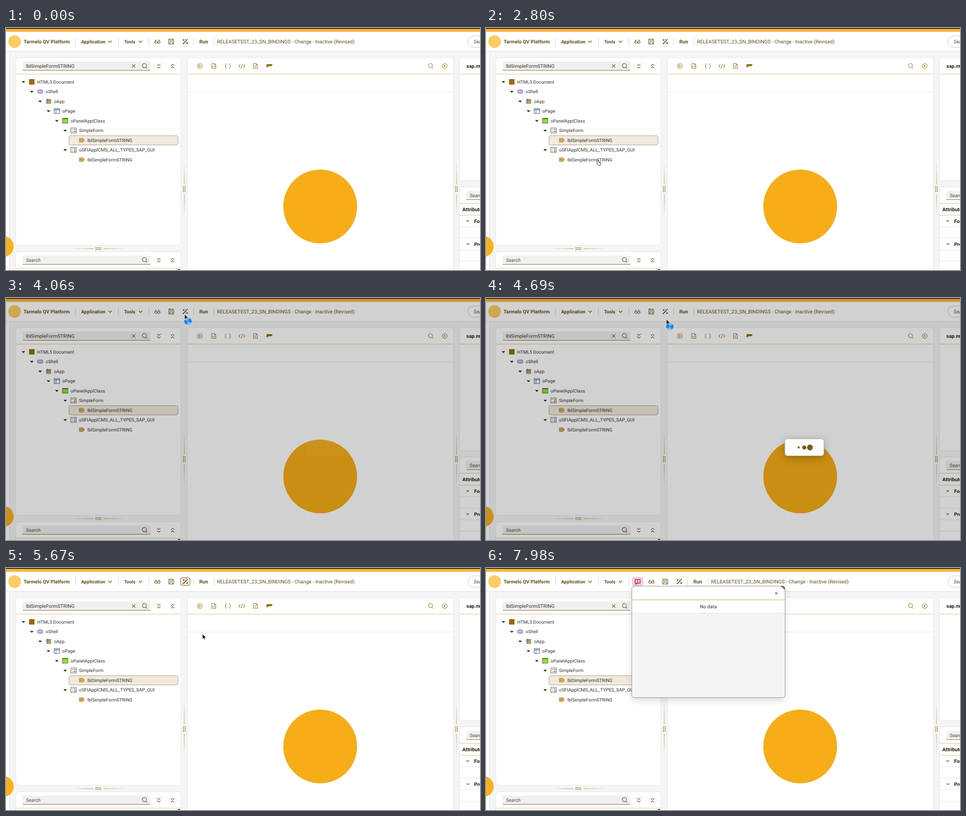
An HTML page for the animation above (8000 ms loop, 1047x535 px).

```html
<!DOCTYPE html>
<html lang="en">
<head>
<meta charset="utf-8">
<title>App designer</title>
<style>
html, body { margin: 0; width: 100%; height: 100%; overflow: hidden; background: #f5f5f5; }
svg { display: block; width: 1047px; height: 535px; }
text { font-family: Roboto, "Open Sans", sans-serif; text-rendering: geometricPrecision; white-space: pre; }
.b { font-weight: 700; }
.i { font-style: italic; }
.ic { fill: none; stroke: #a07a2c; stroke-width: 1.1; }
.dk { stroke: #6b5118; }
.wide { stroke-width: 1.4; }
</style>
</head>
<body>
<svg id="stage" viewBox="0 0 1047 535"></svg>
<script>
const GOLD = '#a07a2c', BROWN = '#644c18', INK = '#32302c', HINT = '#57482a', LINE = '#dcc07a', PALE = '#e4e4e4';

const rect = (x, y, w, h, fill, more = '') =>
  `<rect x="${x}" y="${y}" width="${w}" height="${h}" fill="${fill}" ${more}/>`;
const disc = (x, y, r, fill, more = '') => `<circle cx="${x}" cy="${y}" r="${r}" fill="${fill}" ${more}/>`;
const label = (x, y, size, str, fill = INK, cls = '') =>
  `<text x="${x}" y="${y + size * .35}" font-size="${size}" fill="${fill}" class="${cls}">${str}</text>`;
const icon = (x, y, d, cls = '', more = '') =>
  `<path class="ic ${cls}" transform="translate(${x} ${y})" d="${d}" ${more}/>`;
const group = (id, body) => `<g id="${id}">${body}</g>`;
const hline = (x, y, w, color) => rect(x, y, w, 1, color);
const panel = (x, y, w, h) => rect(x + .5, y + .5, w, h, '#fff', `rx="7" stroke="${PALE}"`);

const LENS = 'M3.2 2.7A4.6 4.6 0 1 0 2.7 3.2L5.8 6.2';
const CROSS = 'M-3.7-3.7 3.7 3.7M3.7-3.7-3.7 3.7';
const CHEVRON = 'M-3.7-1.8 0 1.9 3.7-1.8';
const DOWN2 = 'M-3.7-4.8 0-1.2 3.7-4.8M-3.7 .8 0 4.4 3.7 .8';
const UP2 = 'M-3.7-.8 0-4.4 3.7-.8M-3.7 4.8 0 1.2 3.7 4.8';
const FILE = 'M-4.5-5.5h6L4.5-2.5v8h-9zM1.5-5.5v3h3';
const RING = 'M-5.5 0a5.5 5.5 0 1 0 11 0a5.5 5.5 0 1 0-11 0';

const field = (x, y, w) => rect(x, y - 10, w, 20, '#f0f0ef', 'rx="2"') + hline(x, y + 9, w, '#7d6a3c');

function searchBar(y, text, hint) {
  return field(37, y, 282) + label(44, y, 10.85, text, hint ? HINT : INK, hint ? 'i' : '') +
    icon(306, y - .7, LENS, 'dk') + icon(337.5, y + .3, DOWN2, 'dk') + icon(368, y + .3, UP2, 'dk');
}

// Dotted grip between two fading lines; vertical by default.
function splitter(x, y, turn = 0) {
  let s = rect(-.5, -58, 1, 48, 'url(#fade)') + rect(-.5, 12, 1, 46, 'url(#fadeB)');
  for (let r = 0; r < 4; r++) for (const c of [-1.8, 1.8]) s += rect(c - 1, r * 3.4 - 6.1, 2, 2, GOLD);
  return `<g transform="translate(${x} ${y}) rotate(${turn})">${s}</g>`;
}

function tree() {
  const form = rect(-6, -5.5, 12, 11, '#fff', 'stroke="#555"') +
    '<path d="M-4-2.5h3M-4 2.5h3M1-2.5h3v1h-3zM1 1.5h3v1.5h-3z" fill="none" stroke="#666"/>';
  const tag = '<path d="M-5.5-4H2.5L5.5 0 2.5 4H-5.5z" fill="#fbdc70" stroke="#77560c"/>' +
    '<path d="M-3.2-2V2" stroke="#77560c"/><circle r="1.8" cx=".3" fill="none" stroke="#77560c"/>';
  const app = rect(-4, -4, 9, 9, '#f5c443', 'stroke="#77602a"') +
    '<path d="M-6-2.5H5M-2.5-6V5M-4 1H5M1-4V5" stroke="#2c7ba5" fill="none"/>';
  const page = rect(-6, -5.5, 12, 11, '#fff', 'stroke="#3b5366"') + rect(-5.5, -5, 11, 2.5, '#9fd0ee') +
    '<path d="M-6-2.5H6M-2-2.5V5.5" stroke="#3b5366"/>';
  const rows = [
    [0, 'HTML5 Document', rect(-6, -6, 12, 12, '#96690f')],
    [1, 'oShell', rect(-6, -3.7, 12, 7.4, '#c3b8ee', 'rx="3" stroke="#64608c"')],
    [2, 'oApp', app],
    [3, 'oPage', page],
    [4, 'oPanelApplClass', rect(-6, -5.5, 12, 11, '#92dc48', 'stroke="#3d7414"') + rect(-6, -5.5, 12, 2, '#4d8b1c')],
    [5, 'SimpleForm', form],
    [6, 'lblSimpleFormSTRING', tag],
    [5, 'oSFIApplCMS_ALL_TYPES_SAP_GUI', form, 10.35],
    [6, 'lblSimpleFormSTRING', tag]
  ];
  let s = rect(139, 238, 241, 20.5, '#f1e9dc', 'rx="4" stroke="#5b4420" stroke-dasharray="1.5 1.5"');
  rows.forEach(([depth, name, art, size = 10.05], i) => {
    const x = 69 + depth * 18.45, y = 119 + i * 21.5;
    if (depth < 6) s += `<path d="M${x - 34.5} ${y - 1.5}h8l-4 4.2z" fill="#3f300f"/>`;
    s += `<g transform="translate(${x - 12} ${y})">${art}</g>` + label(x, y, size, name);
  });
  return s;
}

function header() {
  const bar = x => rect(x, 21, 1, 18, '#d6d0c4');
  const spark = (x, y, r) => `M${x} ${y - r}l${r} ${r}-${r} ${r}-${r}-${r}z`;
  const wand = icon(396, 30, 'M-5.3 5.3 3.2-3.2', 'dk', 'style="stroke-width:2"') +
    `<path transform="translate(396 30)" d="${spark(-3.6, -3.4, 2.2) + spark(.8, -5, 1.2) + spark(4.7, -4.7, 1.5) + spark(4, 3.2, 2.2)}" fill="#6b5118"/>`;
  const tools =
    icon(334.5, 30, 'M-5.5 1.5-3.5-3.5h1.5M5.5 1.5 3.5-3.5H2M-.8 1.5h1.6M-5.8 1.5a2.5 2.5 0 1 0 5 0a2.5 2.5 0 1 0-5 0M.8 1.5a2.5 2.5 0 1 0 5 0a2.5 2.5 0 1 0-5 0', 'dk') +
    icon(365, 30, 'M-5.5-5.5H3.5L5.5-3.5V5.5H-5.5zM-3-5.5v3.5H2.5v-3.5M-3 5.5V1H3V5.5', 'dk') +
    rect(385.5, 21.5, 21, 17, '#fbf1e0', `id="hover" rx="4" stroke="${BROWN}"`) + wand +
    bar(414) + label(427, 30, 11, 'Run', BROWN, 'b') + bar(459) +
    label(466, 30, 11.02, 'RELEASETEST_23_SN_BINDINGS - Change - Inactive (Revised)', BROWN);
  const alert = rect(323.5, 20.5, 23, 19, '#fbd3dd', 'rx="4" stroke="#f0a9bb"') +
    icon(335, 30, 'M-5.5-4.5h11v8H-1l-2.5 2.5v-2.5h-2zM0-3v3.2M0 1.2v1.5', 'wide', 'style="stroke:#b0103f"');
  return rect(0, 0, 1047, 51, '#fff') + hline(0, 51, 1047, '#dedede') +
    rect(0, 0, 1047, 2, '#3b2b1a') + rect(0, 2, 1047, 6.5, '#fdb740') +
    disc(19, 30, 14, '#fdcc62') + label(39, 30, 10.8, 'Tarmelo QV Platform', BROWN, 'b') + bar(153) +
    label(166, 30, 10.5, 'Application', BROWN, 'b') + icon(230, 30, CHEVRON, 'dk wide') + bar(248) +
    label(261, 30, 10.2, 'Tools', BROWN, 'b') + icon(297, 30, CHEVRON, 'dk wide') + bar(315) +
    group('alert', alert) + group('tools', tools) +
    rect(1020.5, 17.5, 60, 25, '#fff', 'rx="12.5" stroke="#cfcabf"') + label(1033, 30, 10.8, 'Search', HINT, 'i');
}

function center() {
  const y = 84;
  return panel(400, 65, 588, 500) + hline(401, 101.5, 587, LINE) + hline(401, 141, 587, PALE) +
    icon(428, y, RING + 'M-1.7-2.6V2.6L2.6 0z') +
    icon(459, y, FILE + 'M-1 0-2.7 1.6-1 3.2M1 0 2.7 1.6 1 3.2') +
    icon(490, y, 'M-3-5.2c-3 0-.5 5.2-3.2 5.2c2.7 0 .2 5.2 3.2 5.2M3-5.2c3 0 .5 5.2 3.2 5.2c-2.7 0-.2 5.2-3.2 5.2') +
    icon(521, y, 'M-3.5-3.5-6.8 0-3.5 3.5M3.5-3.5 6.8 0 3.5 3.5M1.4-5-1.4 5') +
    icon(551, y, FILE + 'M-2.3 0h4.6M-2.3 2.5h4.6') +
    '<path d="M575.5 80h13.5l-2.5 4.5h-7l-2 2.5h-2z" fill="#936a13"/>' +
    icon(938, y - .5, LENS) + icon(969, y, RING + 'M-2.2-2.2 2.2 2.2M2.2-2.2-2.2 2.2') +
    disc(694, 394.5, 81.5, '#f6ad17');
}

function rightSide() {
  let s = panel(1001, 65, 80, 272) + hline(1002, 101.5, 60, LINE) + label(1017, 84, 11, 'sap.m', '#221c10', 'b') +
    panel(1001, 351, 80, 250) + field(1017, 370, 60) + label(1024, 370, 10.8, 'Search', HINT, 'i') +
    hline(1002, 387, 60, LINE) + label(1008, 401.5, 11, 'Attribute', '#221c10', 'b') + hline(1002, 413.5, 60, LINE);
  for (const y of [439, 464, 490, 515]) s += hline(1002, y, 60, PALE);
  for (const [y, name] of [[427, 'Form'], [478, 'Properties']])
    s += icon(1020, y - .5, 'M-2.8-1.2 0 1.5 2.8-1.2', 'dk wide') + label(1034, y, 11, name, '#221c10', 'b');
  return s;
}

const popover = rect(322, 40, 338.5, 246.5, '#f4f4f4', 'rx="5" style="filter:drop-shadow(0 7px 8px #0002)"') +
  '<path d="M322 70V45a5 5 0 0 1 5-5h328.5a5 5 0 0 1 5 5V70z" fill="#fff"/>' +
  rect(322, 71, 338.5, 28, '#fff') + hline(322, 70, 338.5, '#cda955') + hline(322, 99, 338.5, PALE) +
  rect(322, 40, 338.5, 246.5, 'none', 'rx="5" stroke="#8494a3"') +
  icon(641.3, 56, 'M-2.6-2.6 2.6 2.6M2.6-2.6-2.6 2.6', 'dk') +
  '<path d="M652 40l8 7.5M655 40l5 4.5" fill="none" stroke="#2b2620" stroke-width="1.2"/>' +
  label(472.5, 85, 10.6, 'No data');

const busy = rect(660, 311.5, 86.5, 37.5, '#fff', 'rx="6" stroke="#8f8f8f" stroke-width=".6" style="filter:drop-shadow(0 4px 9px #0004)"') +
  [690.5, 703, 715.5].map(x => disc(x, 330.5, 2.4, '#7b5c18', 'class="dot"')).join('');

const tip = rect(433.5, 160.5, 56.5, 14.5, '#5b5957', 'stroke="#8b8986" style="filter:drop-shadow(0 1px 2px #0005)"') +
  label(438.5, 168, 9.1, 'Please wait', '#fff', 'b');

const wedge = '<path d="M0 0V-8A8 8 0 0 1 8 0zM0 0V8A8 8 0 0 1-8 0z" fill="#1580e4"/>';
const pointer =
  '<path id="arrow" d="M0 0V11.2L2.6 8.8 4.3 12.4 6.1 11.6 4.5 8.1H7.9z" fill="#000" stroke="#fff" stroke-width=".7"/>' +
  '<path id="hand" d="M4 .5c1 0 1.4.7 1.4 1.3v3l4.3 1c1 .3 1.4.9 1.3 1.8l-.7 3-.8 1.9H4.8L1.5 8.2c-.5-.9.3-1.6 1.2-1.1V1.8c0-.8.5-1.3 1.3-1.3zM7.2 5.5v2M9.2 6v1.7" fill="#fff" stroke="#111" stroke-width=".9"/>' +
  group('spin', disc(0, 0, 8, '#6fbcf7') + wedge);

const grad = (id, a, b) => `<linearGradient id="${id}" x2="0" y2="1"><stop stop-color="#b8923f" stop-opacity="${a}"/>` +
  `<stop offset="1" stop-color="#b8923f" stop-opacity="${b}"/></linearGradient>`;

document.getElementById('stage').innerHTML = `<defs>${grad('fade', .1, 1)}${grad('fadeB', 1, .1)}</defs>` +
  rect(0, 0, 1047, 535, '#f5f5f5') + rect(0, 52, 8, 483, '#fff') + rect(7.5, 52, 1, 483, '#dedede') +
  disc(-6, 483, 23, '#f9b021') +
  panel(21, 65, 365, 415) + searchBar(84, 'lblSimpleFormSTRING', false) + icon(282, 84, CROSS, 'dk') +
  hline(22, 101.5, 364, LINE) + tree() +
  panel(21, 494, 365, 80) + searchBar(513, 'Search', true) + hline(22, 530.5, 364, LINE) + disc(382, 535.5, 3, '#7b5c18') +
  splitter(393.8, 356) + splitter(995, 356) + splitter(204, 487.8, -90) +
  center() + rightSide() + header() + group('popover', popover) +
  rect(0, 2, 1047, 533, '#000', 'id="shade" opacity=".18"') + group('busy', busy) +
  group('tip', tip) + group('pointer', pointer);

const el = id => document.getElementById(id);
const show = (id, on) => el(id).setAttribute('visibility', on ? 'inherit' : 'hidden');
const dots = [...document.querySelectorAll('.dot')];
const clamp = v => Math.min(1, Math.max(0, v));

// Pointer path: time, x, y
const path = [
  [490, 482, 474], [770, 457, 359], [840, 457, 359], [1470, 279, 250], [1680, 267, 247], [1750, 267, 247],
  [1820, 250, 247], [1890, 250, 247], [2170, 228, 262], [2450, 262, 281], [2730, 256, 291], [2800, 243, 291],
  [2870, 243, 291], [3430, 394.5, 36], [4620, 394.5, 36], [4970, 434, 146], [7280, 434, 146],
  [7490, 416, 149], [7910, 528, 119]
];

function pointerAt(t) {
  const i = path.findIndex(p => p[0] > t);
  if (i < 1) return path[i < 0 ? path.length - 1 : 0].slice(1);
  const [a, ax, ay] = path[i - 1], [b, bx, by] = path[i];
  const u = (t - a) / (b - a), k = u * u * (3 - 2 * u);
  return [ax + (bx - ax) * k, ay + (by - ay) * k];
}

function draw(now) {
  const t = Math.floor(now % 8000 / 70) * 70;
  const within = (a, b) => t >= a && t < b;
  const waiting = within(4060, 5670), done = t >= 5740, hand = within(1470, 3010);

  show('pointer', within(560, 7980));
  show('arrow', !hand);
  show('hand', hand);
  show('spin', within(3850, 5670));
  el('pointer').setAttribute('transform', `translate(${pointerAt(t)})`);
  el('spin').setAttribute('transform', `translate(7.5 15.5) rotate(${(t - 3990) * 540 / 1610})`);

  show('hover', within(3430, 4060) || within(5670, 5740));
  show('alert', done);
  el('tools').setAttribute('transform', `translate(${done ? 31 : 0})`);
  show('popover', done);
  el('popover').setAttribute('opacity', t < 5810 ? .6 : 1);

  show('shade', waiting);
  show('busy', waiting);
  el('busy').setAttribute('opacity', clamp((t - 4052) / 250));
  dots.forEach((d, i) => {
    const p = (t - 4060 - 160 * i) / 1600, u = clamp((p - Math.floor(p)) / .4);
    d.setAttribute('r', 2.4 + (p < 0 ? 0 : 4 * Math.sin(Math.PI * u) ** 2));
  });
  show('tip', within(5460, 5670));
}

let start;
requestAnimationFrame(function tick(now) {
  start ??= now;
  draw(now - start);
  requestAnimationFrame(tick);
});
draw(0);
</script>
</body>
</html>
```
